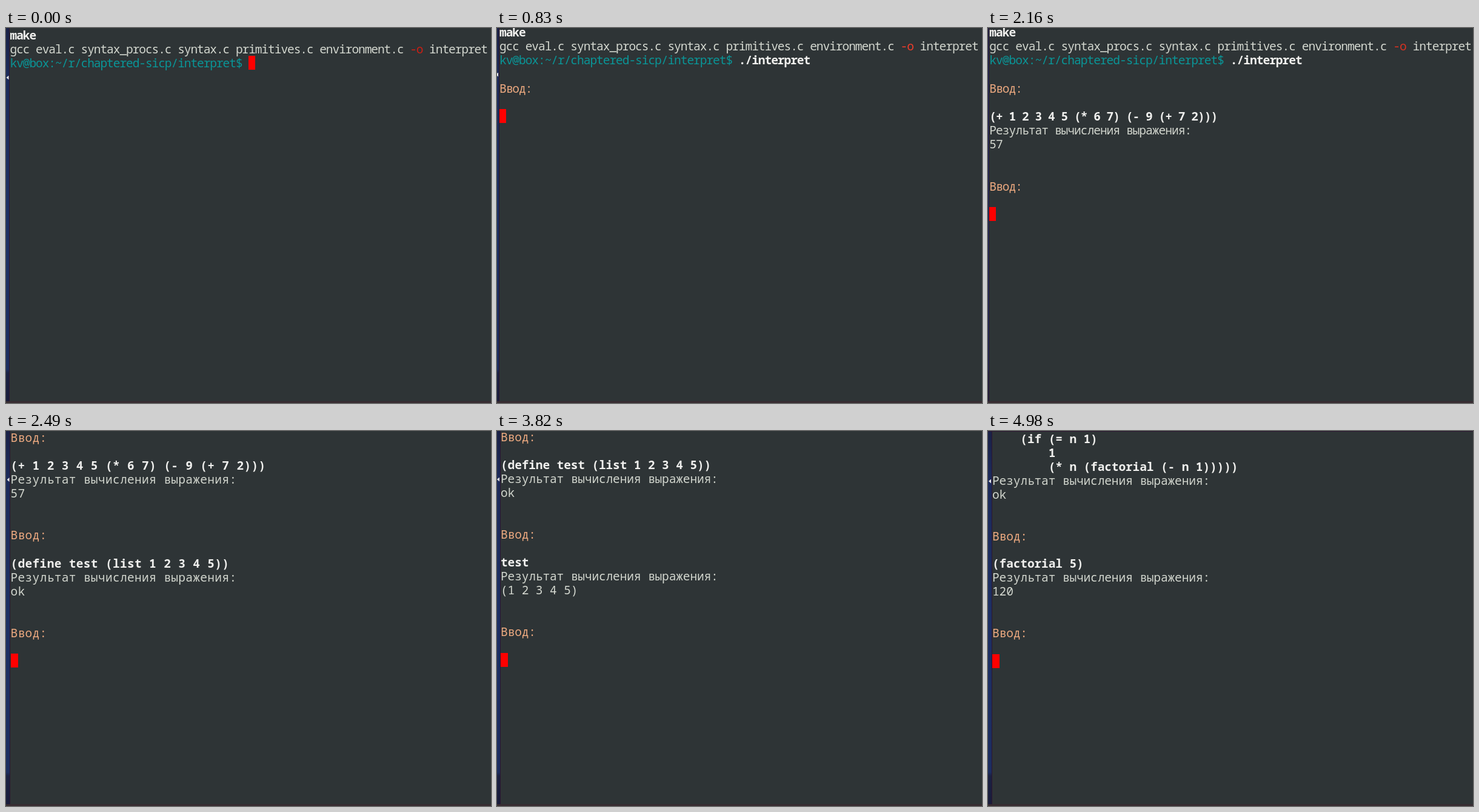
An HTML page for the animation above (5.81 s loop, 800x620 px).

```html
<!DOCTYPE html>
<html lang="ru">
<head>
<meta charset="utf-8">
<title>Scheme interpreter session</title>
<style>
  html, body { margin: 0; width: 100%; height: 100%; overflow: hidden; background: #2e3436; }
  .screen {
    position: absolute; left: 0; top: 0; width: 800px; height: 620px;
    overflow: hidden; visibility: hidden; background: #2e3436; color: #d3d7cf;
    font: 19.5px "Noto Sans Mono", "DejaVu Sans Mono", monospace;
    font-variant-ligatures: none;
  }
  .screen.on { visibility: visible; }
  .screen > * { position: absolute; }
  .row { white-space: pre; }
  .typed { color: #f0f0ee; font-weight: 700; }
  .shell { color: #0a9597; }
  .ask { color: #eeaa80; }
  .flag { color: var(--flag); }
  .cursor { background: #f00; }
  .desk {
    left: 0; top: 0; height: 620px; box-sizing: border-box; border-right: 1px solid #2b1630;
    background: linear-gradient(#1a2146, #1c2a5a 12%, #1d3064 50%, #1c2d60 91%, #1b2143 92%, #191c3a);
  }
  .foot { left: 0; top: 617px; width: 800px; height: 3px; background: #382c31; }
  .head { left: 0; top: 0; width: 800px; height: 1px; background: #2b1630; }
  .arrow { width: 4px; height: 7px; background: #e8e8e8; clip-path: polygon(100% 0, 100% 100%, 0 50%); }
</style>
</head>
<body>
<script>
const STEP = 830;

const typed = s => [["typed", s]];
const plain = s => [["", s]];
const ask = [[["ask", "Ввод:"]], []];
const answer = s => [plain("Результат вычисления выражения:"), plain(s), [], [], ...ask];

// The whole session; each screen is a window onto these rows.
const log = [
  typed("make"),
  [["", "gcc eval.c syntax_procs.c syntax.c primitives.c environment.c "], ["flag", "-o"], ["", " interpret"]],
  [["shell", "kv@box:~/r/chaptered-sicp/interpret$ "], ["typed", "./interpret"]],
  [], ...ask,
  typed("(+ 1 2 3 4 5 (* 6 7) (- 9 (+ 7 2)))"), ...answer("57"),
  typed("(define test (list 1 2 3 4 5))"), ...answer("ok"),
  typed("test"), ...answer("(1 2 3 4 5)"),
  typed("(car test)"), ...answer("1"),
  typed("(define (factorial n)"),
  typed("    (if (= n 1)"),
  typed("        1"),
  typed("        (* n (factorial (- n 1)))))"), ...answer("ok"),
  typed("(factorial 5)"), ...answer("120"),
  []
];

// first row, cursor row, left, top, cell width, row height, arrow y
const views = [
  { first: 0, last: 2, x: 6.5, y: 0, cell: 10.64, pitch: 23.1, arrow: 82, flag: "#cc1f14" },
  { first: 0, last: 6, x: 4, y: -5.1, cell: 10.67, pitch: 23.2, arrow: 77, flag: "#ef3d2c" },
  { first: 0, last: 13, x: 2.3, y: -4.9, cell: 10.74, pitch: 23.16, arrow: 77, flag: "#d93222" },
  { first: 4, last: 20, x: 7.5, y: -1, cell: 12.03, pitch: 23.06, arrow: 80.5 },
  { first: 11, last: 27, x: 6, y: -0.6, cell: 11.57, pitch: 22.97, arrow: 80 },
  { first: 28, last: 44, x: 4.3, y: -4.5, cell: 11.6, pitch: 23.1, arrow: 77 },
  { first: 35, last: 51, x: 7, y: 2.2, cell: 11.58, pitch: 22.92, arrow: 83, head: true }
];

function add(parent, cls, style = {}, text = "", tag = "div") {
  const el = document.createElement(tag);
  el.className = cls;
  el.textContent = text;
  Object.assign(el.style, style);
  return parent.appendChild(el);
}

function build(v) {
  const screen = add(document.body, "screen", { letterSpacing: `calc(${v.cell}px - 0.6em)` });
  screen.style.setProperty("--flag", v.flag || "#cc1f14");
  add(screen, "desk", { width: v.x - 0.5 + "px" });
  add(screen, "foot");
  if (v.head) add(screen, "head");
  add(screen, "arrow", { left: v.x - 6 + "px", top: v.arrow - 3.5 + "px" });

  for (let i = v.first; i <= v.last; i++) {
    const top = v.y + (i - v.first) * v.pitch + "px";
    // Nothing has been typed yet on the cursor row.
    const parts = i < v.last ? log[i] : log[i].filter(([cls]) => cls !== "typed");
    const row = add(screen, "row", { left: v.x + "px", top, lineHeight: v.pitch + "px" });
    for (const [cls, text] of parts) add(row, cls, {}, text, "span");
    if (i === v.last) {
      const col = parts.reduce((n, [, text]) => n + text.length, 0);
      add(screen, "cursor", {
        left: v.x + col * v.cell + "px", top, width: v.cell + "px", height: v.pitch + "px"
      });
    }
  }
  return screen;
}

const screens = views.map(build);
const start = performance.now();

function draw() {
  const now = Math.floor((performance.now() - start) / STEP) % screens.length;
  screens.forEach((s, i) => s.classList.toggle("on", i === now));
  requestAnimationFrame(draw);
}
draw();
</script>
</body>
</html>
```
